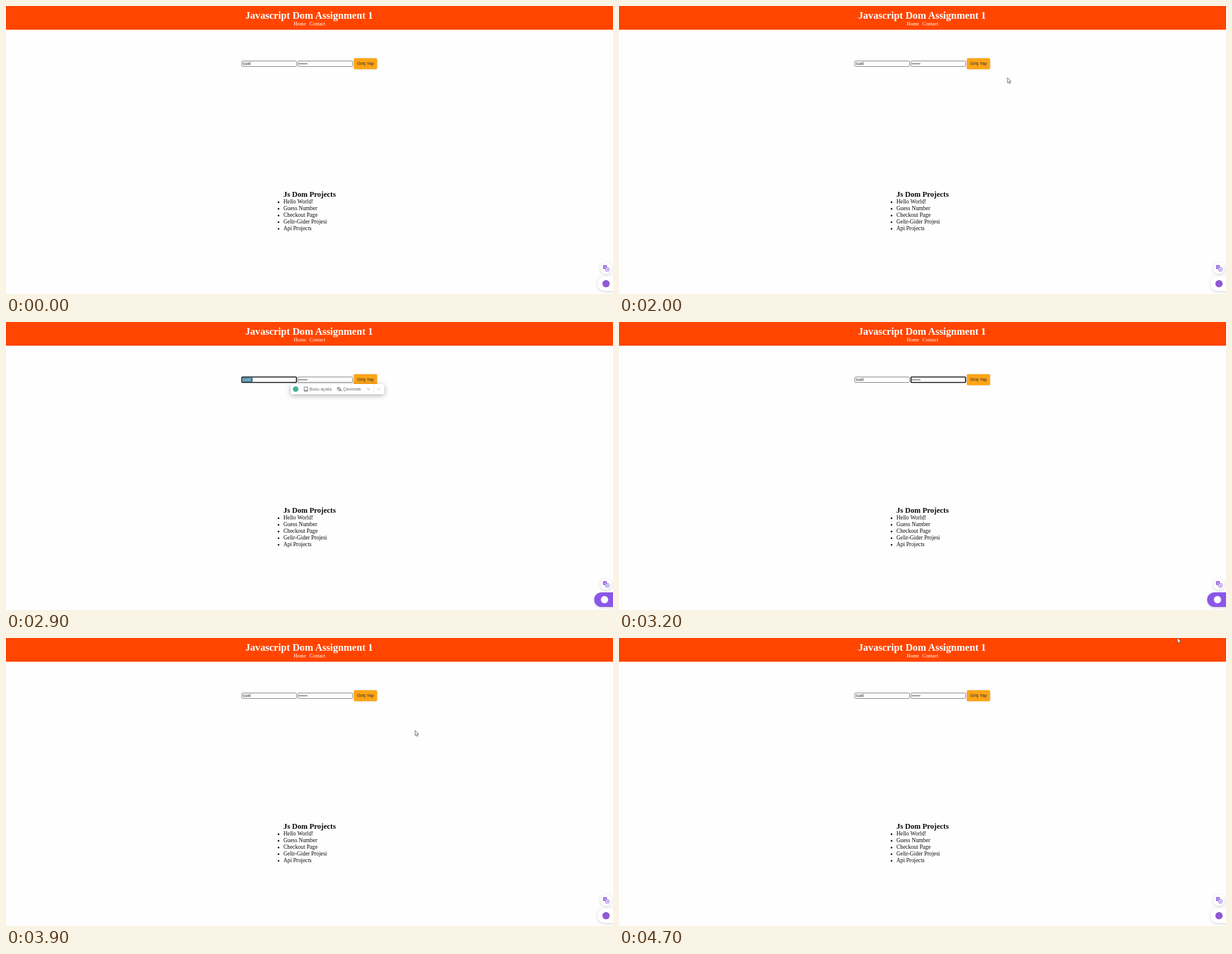
Write an HTML page that moves like this. It is 1000 px wide and 474 px high and loops after 5100 ms.

```html
<!DOCTYPE html>
<html lang="tr">
<head>
<meta charset="utf-8">
<title>Javascript Dom Assignment 1</title>
<style>
html, body { margin: 0; width: 100%; height: 100%; overflow: hidden; background: #fefefe; }
svg { display: block; width: 100%; height: 100%; }
text { font-family: "Liberation Serif", "Times New Roman", serif; }
.ui text { font-family: "Liberation Sans", Arial, sans-serif; font-size: 6.95px; }
.field { fill: #fff; stroke: #767676; stroke-width: .9; }
.field.on { stroke: #0c0c10; stroke-width: 1.6; }
.line { fill: none; stroke: #555; stroke-width: .8; }
.soft { filter: drop-shadow(0 1px 2px rgba(0, 0, 0, .18)); }
</style>
</head>
<body>
<svg viewBox="0 0 1000 474">
  <rect width="1000" height="39" fill="#ff4500"/>
  <g fill="#fff">
    <text x="394" y="20.6" font-size="16.6" font-weight="bold">Javascript Dom Assignment 1</text>
    <text x="474" y="32" font-size="8.35">Home</text>
    <text x="500" y="32" font-size="8.35">Contact</text>
  </g>

  <g id="list" fill="#0a0a0a">
    <text x="457" y="314" font-size="12.48" font-weight="bold">Js Dom Projects</text>
  </g>

  <g class="ui">
    <rect id="nameBox" class="field" x="388.5" y="90.5" width="90" height="9" rx="1.2"/>
    <rect id="nameSel" x="389.6" y="91.3" height="7.5" fill="#3f7d9b"/>
    <text id="name" x="390" y="97.4">suat</text>

    <rect id="passBox" class="field" x="481" y="90.5" width="90" height="9" rx="1.2"/>
    <rect id="passSel" x="482" y="91.3" height="7.5" fill="#7a4fd0"/>
    <g id="dots"></g>

    <g style="filter: drop-shadow(0 .8px .8px rgba(0, 0, 0, .25))">
      <rect x="573" y="86" width="38.3" height="18" rx="2.2" fill="#ffa516"/>
    </g>
    <text x="578.2" y="97.4" fill="#29283a">Giriş Yap</text>

    <g id="popup">
      <rect width="154" height="17" rx="4" fill="#fff" style="filter: drop-shadow(0 2px 4px rgba(0, 0, 0, .32))"/>
      <circle id="badge" cx="8.2" cy="8.5" r="4.6"/>
      <path class="line" d="M22.2 5h5.6v7h-5.6zM22.2 10.4h5.6"/>
      <text x="31" y="11">Bunu açıkla</text>
      <path class="line" d="M76 6h5M78.5 5v1M80 6q-1 3-3.8 4M77 6.5q1 2.5 3.2 3.3M79.6 12.2l2.1-5 2.1 5M80.4 10.8h2.6"/>
      <text x="86.5" y="11">Çevirmek</text>
      <path class="line" d="M125.8 7.3l2.4 2.4 2.4-2.4" stroke-opacity=".8"/>
      <path d="M137 .5v16" stroke="#e6e6e6" stroke-width=".8"/>
      <path d="M143 6.4l4.4 4.4M147.4 6.4l-4.4 4.4" stroke="#c9c9c9" stroke-width=".8"/>
    </g>

    <g class="soft"><circle cx="988.5" cy="431.5" r="9.5" fill="#fff"/></g>
    <rect x="983.6" y="426.6" width="6.2" height="6.2" rx="1" fill="#8a5be0"/>
    <path d="M985.2 428.2l3 3M988.2 428.2l-3 3" stroke="#fff" stroke-width=".8"/>
    <rect x="987.8" y="430.6" width="5.8" height="5.8" rx="1" fill="#fff" stroke="#8a5be0" stroke-width=".9"/>
    <path d="M989.2 435l1.5-3.3 1.5 3.3M989.7 434h2" fill="none" stroke="#8a5be0" stroke-width=".7"/>

    <g class="soft"><rect id="pill" y="445" width="60" height="24" rx="12"/></g>
    <circle id="mark" cy="457" r="6"/>
  </g>

  <path id="cursor" d="M0 0V8.6L1.9 6.8 3.3 9.9 4.6 9.3 3.3 6.3H5.9Z" fill="#fff" stroke="#444" stroke-width=".75" stroke-linejoin="round"/>
</svg>
<script>
const LOOP = 5100, TICK = 100;
const $ = id => document.getElementById(id);

function add(parent, tag, attrs, label) {
  const el = document.createElementNS(parent.namespaceURI, tag);
  for (const k in attrs) el.setAttribute(k, attrs[k]);
  if (label) el.textContent = label;
  parent.append(el);
}

["Hello World!", "Guess Number", "Checkout Page", "Gelir-Gider Projesi", "Api Projects"].forEach((label, i) => {
  const y = 325.3 + i * 10.95;
  add($("list"), "circle", { cx: 449, cy: y - 2.3, r: 1.4 });
  add($("list"), "text", { x: 457, y, "font-size": 9.36 }, label);
});
for (let i = 0; i < 6; i++) add($("dots"), "circle", { cx: 483.3 + i * 2.43, cy: 95.1, r: .85 });

// time, x, y
const path = [
  [500, 862.5, 125.5], [600, 866, 125.8], [1400, 866, 125.8], [1500, 865.7, 128.7],
  [1800, 735, 126], [2000, 640, 118], [2100, 585, 109], [2300, 470, 97],
  [3400, 495, 92], [3500, 604, 147], [3700, 665, 152], [3900, 674, 152],
  [4300, 730, 138], [4500, 830, 75], [4700, 920, -.4], [5100, 920, -.4]
];

const during = (t, a, b) => t >= a && t < b;
const ramp = (t, a, b) => Math.max(0, Math.min(1, (t - a) / (b - a)));
const show = (el, on) => el.setAttribute("visibility", on ? "visible" : "hidden");

function pointAt(t) {
  let i = 1;
  while (i < path.length - 1 && path[i][0] < t) i++;
  const [a, x, y] = path[i - 1], [b, u, v] = path[i];
  const k = ramp(t, a, b);
  return [x + (u - x) * k, y + (v - y) * k];
}

function draw(ms) {
  const t = Math.floor((ms % LOOP) / TICK) * TICK;

  const onName = during(t, 2300, 3200), onPass = during(t, 3200, 3800);
  $("nameBox").classList.toggle("on", onName);
  $("passBox").classList.toggle("on", onPass);

  const nameSel = onName ? ramp(t, 2500, 2700) : 0;
  const passSel = onPass ? ramp(t, 3200, 3400) : 0;
  $("nameSel").setAttribute("width", 16.8 * nameSel);
  $("passSel").setAttribute("width", 14.5 * passSel);
  $("name").setAttribute("fill", nameSel === 1 ? "#d5e9ec" : "#222");
  $("dots").setAttribute("fill", passSel === 1 ? "#fff" : "#222");

  const first = during(t, 2800, 3200);
  show($("popup"), first || during(t, 3400, 3800));
  $("popup").setAttribute("transform", first ? "translate(469 102)" : "translate(501 97)");
  $("popup").setAttribute("fill", first ? "#666" : "#484848");
  $("badge").setAttribute("fill", first ? "#45b397" : "#5f7f98");

  const open = during(t, 2700, 3800);
  $("pill").setAttribute("x", open ? 969 : 974.5);
  $("pill").setAttribute("fill", open ? "#8b57e8" : "#fff");
  $("mark").setAttribute("cx", open ? 986 : 988.5);
  $("mark").setAttribute("fill", open ? "#fff" : "#8f58d4");

  show($("cursor"), during(t, 500, 2300) || t >= 3500);
  $("cursor").setAttribute("transform", `translate(${pointAt(t)})`);
}

const start = performance.now();
function loop() {
  draw(performance.now() - start);
  requestAnimationFrame(loop);
}
loop();
</script>
</body>
</html>
```
